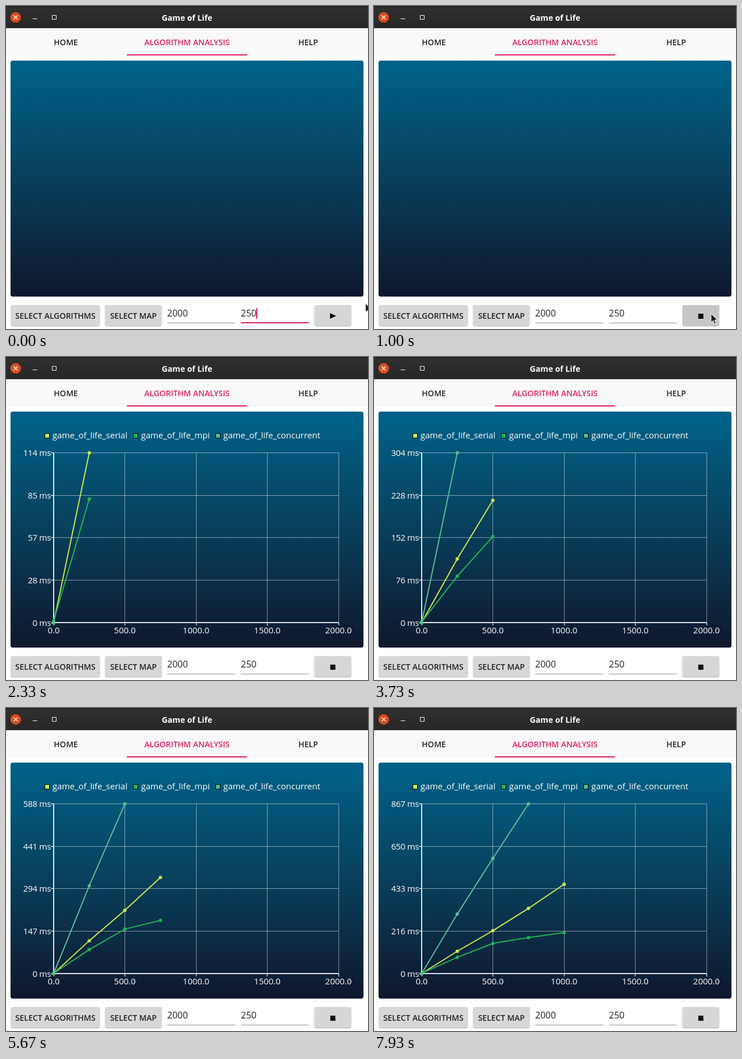
Recreate the animation shown at these times as an HTML page. Size 638 px wide and 568 px high, loop 8000 ms.

```html
<!DOCTYPE html>
<html lang="en">
<head>
<meta charset="utf-8">
<title>Game of Life</title>
<style>
  html, body { margin: 0; width: 100%; height: 100%; overflow: hidden; background: #fff; }
  svg { display: block; width: 638px; height: 568px; font: 15px "Open Sans", "Noto Sans", sans-serif; }
  .caps { font-size: 14px; font-weight: 600; fill: #212121; text-anchor: middle; }
  .field { font-size: 16px; fill: #212121; }
  .btn { fill: #d6d7d7; filter: drop-shadow(0 1px 1.2px rgba(0, 0, 0, .35)); }
  .label { fill: #fff; }
  .mid { text-anchor: middle; }
  .end { text-anchor: end; letter-spacing: -.35px; }
  .grid { stroke: #fff; stroke-opacity: .5; fill: none; }
  .axis { stroke: #dfe5ea; stroke-width: 2; fill: none; }
  .line { stroke-width: 2; fill: none; }
</style>
</head>
<body>
<svg viewBox="0 0 638 568">
  <defs>
    <linearGradient id="bar" x2="0" y2="1">
      <stop stop-color="#303030"/><stop offset="1" stop-color="#272727"/>
    </linearGradient>
    <linearGradient id="sea" x2="0" y2="1">
      <stop stop-color="#006289"/><stop offset=".5" stop-color="#083f5b"/><stop offset="1" stop-color="#0f172d"/>
    </linearGradient>
  </defs>

  <rect width="638" height="568" fill="#fff"/>
  <rect width="638" height="39" fill="url(#bar)"/>
  <rect width="638" height="1.5" fill="#1b1b1b"/>
  <circle cx="17" cy="20" r="9.3" fill="#dd4b1a"/>
  <path d="M13.5 16.5l7 7m0-7l-7 7" stroke="#fff" stroke-width="1.4"/>
  <path d="M47 22.5h8M81.5 16.5h7v7h-7z" stroke="#fff" fill="none"/>
  <text x="319" y="26" fill="#fff" text-anchor="middle" font-size="14.2" font-weight="700">Game of Life</text>

  <rect y="39" width="638" height="48" fill="#f9f9f9"/>
  <rect x="213" y="85" width="212" height="2" fill="#e01e5f"/>
  <g class="caps">
    <text x="105.5" y="69">HOME</text>
    <text x="319" y="69" style="fill:#e01e5f">ALGORITHM ANALYSIS</text>
    <text x="532.5" y="69">HELP</text>
  </g>

  <rect x="8" y="96" width="622" height="415" rx="4" fill="url(#sea)"/>
  <g id="chart"></g>

  <rect class="btn" x="9" y="526" width="156" height="36" rx="2"/>
  <rect class="btn" x="175" y="526" width="99" height="36" rx="2"/>
  <rect class="btn" id="run" x="544" y="526" width="64" height="36" rx="2"/>
  <path id="icon" fill="#111"/>
  <g class="caps">
    <text x="87" y="550">SELECT ALGORITHMS</text>
    <text x="224.5" y="550">SELECT MAP</text>
  </g>
  <g class="field">
    <text x="284" y="546">2000</text>
    <text x="414" y="546">250</text>
  </g>
  <path d="M284 557.5h120" stroke="#929292"/>
  <path id="underline"/>
  <rect id="caret" x="441" y="531" width="2" height="19" fill="#e01e5f"/>
  <path id="cursor" d="M0 0v15.5l3.6-3.3 2.5 5.6 2.6-1.2-2.5-5.4h5z" fill="#1a1a1a" stroke="#fff" stroke-width="1"/>
</svg>

<script>
const FPS = 15, FRAMES = 120;
const TOP = 168.5, BOTTOM = 467, RIGHT = 586, SPAN = 2000, STEP = 250;
const series = [
  { name: 'serial', color: '#cbe850' },
  { name: 'mpi', color: '#1fb452' },
  { name: 'concurrent', color: '#58bd9b' }
];
const legendStart = [237, 164, 68], legendOffset = [0, 156, 301];

// [frame, series, milliseconds]: each row adds the next sample of a series
const samples = [
  [16, 0, 0], [21, 1, 1], [27, 2, 0],
  [29, 0, 114], [35, 1, 83], [45, 2, 304],
  [48, 0, 219], [56, 1, 154], [70, 2, 588],
  [76, 0, 333], [85, 1, 184], [104, 2, 867],
  [111, 0, 456], [119, 1, 209]
];

// [frame, x, y] of the pointer tip
const pointer = [
  [0, 633.5, 523], [1, 631, 524], [4, 620, 530], [8, 601, 538], [11, 594, 541],
  [20, 594, 541], [21, 612, 539], [22, 627, 537], [23, 640, 535]
];
// [frame, amount] of the run button's hover tint
const hover = [[6, 0], [10, 1], [24, 1], [30, 0]];

const el = id => document.getElementById(id);
const set = (id, attrs) => { for (const k in attrs) el(id).setAttribute(k, attrs[k]); };

function track(keys, f, col = 1) {
  const i = keys.findIndex(k => k[0] > f);
  if (i === 0) return keys[0][col];
  if (i < 0) return keys[keys.length - 1][col];
  const a = keys[i - 1], b = keys[i];
  return a[col] + (b[col] - a[col]) * (f - a[0]) / (b[0] - a[0]);
}

function chart(f) {
  const rows = samples.filter(r => r[0] <= f);
  if (!rows.length) return '';
  const data = series.map((_, s) => rows.filter(r => r[1] === s).map(r => r[2]));
  const max = Math.max(10, ...rows.map(r => r[2]));
  const left = max > 99 ? 84 : 76;
  const px = v => left + (RIGHT - left) * v / SPAN;
  const py = v => BOTTOM - (BOTTOM - TOP) * v / max;
  let out = '', grid = '', ticks = '';

  for (let k = 0; k <= 4; k++) {
    const x = Math.floor(px(k * 500)) + .5, y = Math.floor(py(max * k / 4)) + .5;
    if (k) grid += `M${left} ${y}H${RIGHT}M${x} ${TOP}V${BOTTOM}`;
    ticks += `M${left - 5} ${y}H${left}M${x} ${BOTTOM}v5`;
    out += `<text class="label end" x="${left - 5}" y="${y + 5.5}">${Math.floor(max * k / 4)} ms</text>`
      + `<text class="label mid" x="${px(k * 500)}" y="486">${k * 500}.0</text>`;
  }
  out += `<path class="grid" d="${grid}"/>`
    + `<path d="${ticks}" stroke="#dfe5ea" stroke-width="1.3"/>`
    + `<path class="axis" d="M${left} ${TOP}V${BOTTOM}H${RIGHT}"/>`;

  const shown = data.filter(d => d.length).length;
  data.forEach((values, s) => {
    if (!values.length) return;
    const { name, color } = series[s];
    const x = legendStart[shown - 1] + legendOffset[s];
    const pts = values.map((v, i) => [px(i * STEP), py(v)]);
    out += `<rect x="${x + .5}" y="134.5" width="8" height="8" fill="${color}" stroke="#000"/>`
      + `<text class="label" x="${x + 14}" y="143">game_of_life_${name}</text>`
      + `<polyline class="line" stroke="${color}" points="${pts.join(' ')}"/>`
      + pts.map(p => `<circle cx="${p[0]}" cy="${p[1]}" r="3" fill="${color}"/>`).join('');
  });
  return out;
}

let last = -1;
function draw(f) {
  if (f === last) return;
  last = f;
  const running = f >= 14;
  el('chart').innerHTML = chart(f);
  set('icon', { d: running ? 'M571.5 541h9v9h-9z' : 'M571 540l11 5-11 5z' });
  set('underline', running
    ? { d: 'M414 557.5h120', stroke: '#929292', 'stroke-width': 1 }
    : { d: 'M414 557h120', stroke: '#e01e5f', 'stroke-width': 2 });
  set('caret', { opacity: f < 6 ? 1 : 0 });
  const tone = Math.round(214 - 16 * track(hover, f));
  el('run').style.fill = `rgb(${tone},${tone},${tone})`;
  set('cursor', { transform: `translate(${track(pointer, f, 1)} ${track(pointer, f, 2)})` });
}

const start = performance.now();
function tick() {
  draw(Math.floor((performance.now() - start) * FPS / 1000 + .07) % FRAMES);
  requestAnimationFrame(tick);
}
tick();
</script>
</body>
</html>
```
